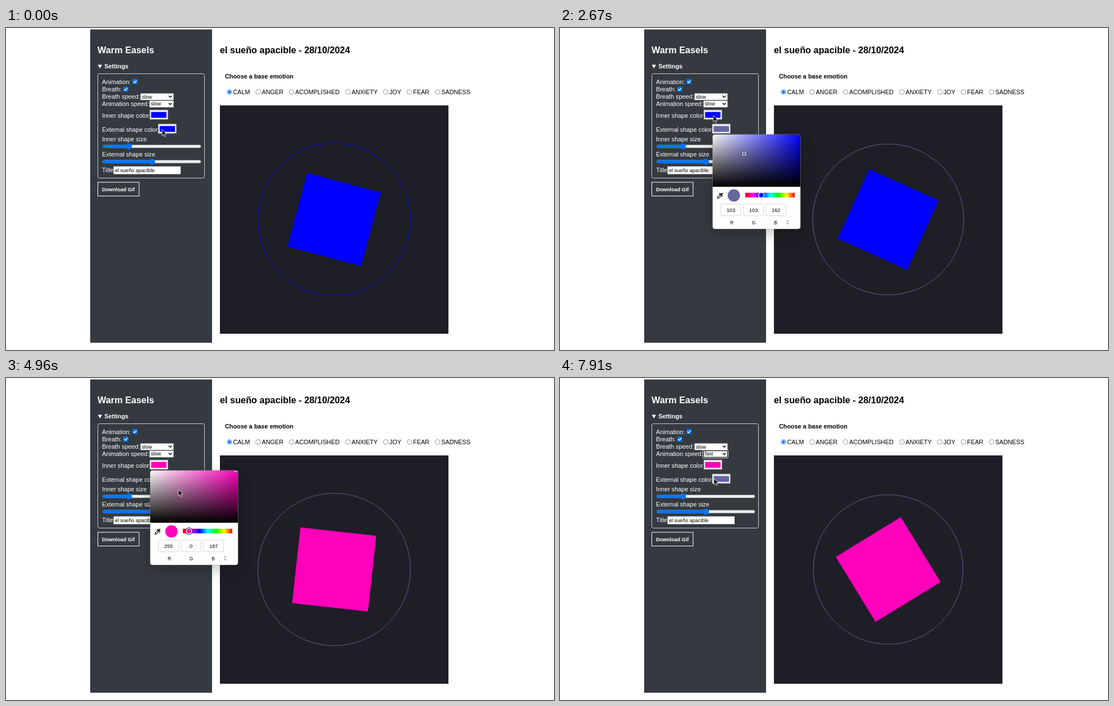
Recreate the animation shown at these times as an HTML page. Size 976 by 574 pixels, loop 8 s.

```html
<!DOCTYPE html>
<html lang="en">
<head>
<meta charset="utf-8">
<title>Warm Easels</title>
<style>
  html, body { margin: 0; width: 100%; height: 100%; overflow: hidden; background: #fff; }
  svg { position: absolute; left: 0; top: 0; overflow: hidden; }
  text { font: 10.87px "Liberation Sans", Arial, sans-serif; }
  .h { font-size: 16.3px; font-weight: bold; }
  .b { font-weight: bold; }
  .s { font-size: 9.05px; }
  .m { font-size: 9.2px; text-anchor: middle; }
  .w { fill: #fff; }
  .box { fill: #fff; stroke: #767676; stroke-width: .7; }
  .line { fill: none; stroke: #fff; }
  .chevron { fill: none; stroke: #000; stroke-width: 1.3; }
  #picker, #menu { position: absolute; box-sizing: border-box; overflow: hidden; }
  #picker { width: 158px; height: 170px; border-radius: 5px; border: 1px solid rgba(128,128,128,.5);
            box-shadow: 0 10px 22px rgba(0,0,0,.2); }
  #picker svg { left: -1px; top: -1px; }
  #menu { left: 256px; top: 142px; width: 43px; height: 49px; border-radius: 2px 2px 4px 4px;
          background: #fff; box-shadow: 0 2px 5px rgba(0,0,0,.3); }
</style>
</head>
<body>
<svg width="976" height="574">
  <rect x="150" y="2.5" width="217" height="558.5" fill="#343a40"/>
  <g class="w">
    <text class="h" x="163" y="45">Warm Easels</text>
    <path d="M163.5 65.5h7.5l-3.75 6.5z"/>
    <text class="b" x="175.3" y="72">Settings</text>
    <text x="171" y="100">Animation:</text>
    <text x="171" y="113">Breath:</text>
    <text x="171" y="126">Breath speed:</text>
    <text x="171" y="138.5">Animation speed:</text>
    <text x="171" y="159.5">Inner shape color</text>
    <text x="171" y="184.5">External shape color</text>
    <text x="171" y="201.5">Inner shape size</text>
    <text x="171" y="228.5">External shape size</text>
    <text x="171" y="257">Title</text>
    <text class="s b" x="171" y="290.5">Download Gif</text>
  </g>
  <rect class="line" x="163.5" y="81.5" width="190" height="186" rx="3" stroke-opacity=".75"/>
  <rect class="line" x="163.5" y="275" width="73.5" height="24.5"/>
  <g id="checks"></g>

  <rect class="box" x="239.5" y="116.5" width="59" height="12"/>
  <text class="s" x="242" y="125.5">slow</text>
  <path class="chevron" d="M289.7 120.7l2.8 2.8 2.8-2.8"/>
  <rect class="box" x="255.5" y="129.5" width="43" height="12"/>
  <text class="s" id="speed" x="258" y="138.2">slow</text>
  <path class="chevron" d="M289.7 133.7l2.8 2.8 2.8-2.8"/>
  <g id="focus" fill="none">
    <rect x="254.6" y="128.6" width="44.8" height="13.8" rx="1.5" stroke="#fff"/>
    <rect x="255.6" y="129.6" width="42.8" height="11.8" rx="1" stroke="#101010" stroke-width="1.3"/>
  </g>

  <g fill="#efefef" stroke="#767676" stroke-width=".7">
    <rect x="256" y="146" width="32.5" height="17"/>
    <rect x="271" y="171" width="32.5" height="17"/>
  </g>
  <rect id="innerSwatch" x="258.5" y="149.7" width="27.3" height="10.3"/>
  <rect id="outerSwatch" x="273.7" y="174.8" width="27.3" height="10.3"/>
  <g id="sliders"></g>
  <rect x="191.5" y="246.7" width="119.5" height="13.8" fill="#fff"/>
  <text class="s" x="194" y="256.7">el sueño apacible</text>

  <text class="h" x="381" y="45">el sueño apacible - 28/10/2024</text>
  <text class="b" x="390" y="90">Choose a base emotion</text>
  <g id="radios"></g>
  <rect x="381" y="138" width="407" height="407" fill="#1e1e26"/>
  <circle id="ring" cx="584.5" cy="341.3" fill="none" stroke-width=".9"/>
  <rect id="square" x="-67.9" y="-67.9" width="135.8" height="135.8"/>
</svg>

<div id="picker">
  <svg id="panel" width="158" height="170">
    <defs>
      <linearGradient id="tint"><stop stop-color="#fff"/><stop id="pure" offset="1"/></linearGradient>
      <linearGradient id="shade" x2="0" y2="1">
        <stop stop-opacity="0"/><stop offset="1"/>
      </linearGradient>
      <linearGradient id="hues"></linearGradient>
    </defs>
    <rect width="158" height="170" fill="#fff"/>
    <rect width="158" height="94" fill="url(#tint)"/>
    <rect width="158" height="94" fill="url(#shade)"/>
    <g id="spot" fill="none">
      <circle r="4.6" stroke="#000" stroke-width="1"/>
      <circle r="3.6" stroke="#fff" stroke-width="1.4"/>
    </g>
    <g fill="none" stroke="#111" stroke-width="1.2">
      <path d="M9.5 114.5l.6-2.6 4.6-4.6 2 2-4.6 4.6z"/>
      <path d="M13.7 106.2l4 4M16 107.8l2-2" stroke-width="2.2" stroke-linecap="round"/>
    </g>
    <circle id="sample" cx="38.7" cy="109.5" r="11"/>
    <rect x="59" y="104.7" width="88" height="8.3" fill="url(#hues)"/>
    <circle id="halo" cy="109" r="6.5"/>
    <circle id="thumb" cy="109" r="4.8" stroke="#fff" stroke-width="1.4"/>
    <g id="fields"></g>
    <path d="M132.6 156.3l1.6-1.8 1.6 1.8M132.6 158.8l1.6 1.8 1.6-1.8" fill="none" stroke="#222" stroke-width=".9"/>
  </svg>
</div>

<div id="menu">
  <svg width="43" height="49">
    <rect id="hover" width="43" height="16.3" fill="#1a66d0"/>
    <g id="options"></g>
  </svg>
</div>

<svg width="976" height="574">
  <path id="pointer" d="M0 0v11.2l2.6-2.4 1.8 4 1.8-.8-1.8-3.9h3.6z" fill="#000" stroke="#fff" stroke-width=".8"/>
</svg>

<script>
const $ = id => document.getElementById(id);
const set = (id, attrs) => { for (const k in attrs) $(id).setAttribute(k, attrs[k]); };
const show = (id, on) => { $(id).style.display = on ? "" : "none"; };
const fill = (id, items, make) => { $(id).innerHTML = items.map(make).join(""); };

// Static repeats
fill("checks", [[225.3, 91], [208.8, 104.5]], ([x, y]) =>
  `<rect x="${x}" y="${y}" width="9" height="9" rx="1.5" fill="#0075ff"/>
   <path class="line" d="M${x + 1.7} ${y + 4.6}l2 2 3.6-4.2" stroke-width="1.4"/>`);
fill("sliders", [[219, 211], [260, 238.3]], ([x, y]) =>
  `<rect x="172.5" y="${y - 2.5}" width="174.5" height="5" rx="2.5" fill="#efefef" stroke="#b2b2b2" stroke-width=".6"/>
   <rect x="172.3" y="${y - 2.7}" width="${x - 172}" height="5.4" rx="2.7" fill="#0075ff"/>
   <circle cx="${x}" cy="${y}" r="5.4" fill="#0075ff"/>`);
fill("radios", [["CALM", 398], ["ANGER", 449], ["ACOMPLISHED", 508.5], ["ANXIETY", 609],
  ["JOY", 676.3], ["FEAR", 718.5], ["SADNESS", 768.7]], ([name, x], i) =>
  `<circle cx="${x}" cy="114" r="4.1" fill="#fff" stroke="${i ? "#767676" : "#0075ff"}" stroke-width=".8"/>
   ${i ? "" : `<circle cx="${x}" cy="114" r="2.7" fill="#0075ff"/>`}
   <text x="${x + 6.5}" y="118">${name}</text>`);
fill("hues", [0, 1, 2, 3, 4, 5, 6], i =>
  `<stop offset="${i / 6}" stop-color="hsl(${360 - i * 60},100%,50%)"/>`);
fill("fields", ["R", "G", "B"], (name, i) =>
  `<rect x="${15.5 + i * 40.3}" y="124.8" width="35.5" height="21" rx="1.5" fill="#fff" stroke="#d4d4d4"/>
   <text class="m" id="value${i}" x="${33.4 + i * 40.2}" y="138.7"></text>
   <text class="m" x="${35 + i * 39}" y="160.5" style="font-size:8.5px">${name}</text>`);
fill("options", ["slow", "normal", "fast"], (name, i) =>
  `<text class="s" id="option${i}" x="2.5" y="${12.2 + i * 16.2}">${name}</text>`);

// Linear interpolation through rows of [key, ...values]
function at(rows, key) {
  const i = rows.findIndex(r => r[0] > key);
  if (i < 0) return rows.at(-1).slice(1);
  const a = rows[i - 1], b = rows[i], f = (key - a[0]) / (b[0] - a[0]);
  return a.slice(1).map((v, j) => v + (b[j + 1] - v) * f);
}

const ticks = [[0, 0], [150, 1], [1120, 8], [1270, 9], [1520, 11], [1650, 12], [2310, 17], [2430, 18],
  [2670, 20], [2790, 21], [3330, 25], [3480, 26], [3990, 30], [4140, 31], [4410, 33], [4540, 34],
  [4960, 37], [5110, 38], [5510, 41], [5660, 42], [6140, 46], [6260, 47], [6560, 49], [6710, 50],
  [7640, 57], [7790, 58], [7910, 59], [8000, 60]];
const steps = ticks.map(([ms, n]) => [n, ms]);
const spin = [[0, 15], [1520, 121.7], [2670, 204.3], [3990, 298.3], [4960, 366.3], [6140, 451],
  [6850, 501.5], [7910, 688.5], [8000, 704.4]];
const path = [[0, 278, 181], [700, 278, 181], [1520, 329, 225], [1650, 328, 224], [2000, 328, 224],
  [2310, 275, 167], [2670, 273, 156], [3100, 273, 156], [3900, 327, 272], [4350, 327, 272],
  [4960, 307, 199], [5450, 269, 131], [6140, 269, 134], [6700, 274, 179], [8000, 274, 179]];

const BLUE = [0, 0, 255], MAUVE = [103, 103, 162], PINK = [255, 0, 187];
const css = c => `rgb(${c})`;

function drawPicker(t, inner, outer) {
  const first = t < 3000, color = first ? outer : inner, pink = color === PINK;
  const opened = first ? 560 : 3980, closed = first ? 2780 : 5700;
  show("picker", t >= opened && t < closed);
  show("panel", t >= opened + 140);
  $("picker").style.left = (first ? 270.6 : 255.6) + "px";
  $("picker").style.top = (first ? 189 : 164) + "px";
  set("pure", { "stop-color": css(pink ? PINK : BLUE) });
  set("spot", { transform: color === MAUVE ? "translate(57 35)" : "translate(154 0)" });
  set("sample", { fill: css(color) });
  set("thumb", { cx: pink ? 70 : 87.5, fill: css(pink ? PINK : BLUE) });
  set("halo", { cx: 70 });
  show("halo", pink);
  color.forEach((v, i) => { $("value" + i).textContent = v; });
}

function draw(ms) {
  const [t] = at(steps, Math.floor(at(ticks, ms)[0] + 1e-6));
  const inner = t < 4250 ? BLUE : PINK, outer = t < 1850 ? BLUE : MAUVE, fast = t >= 6830;
  const [x, y] = at(path, t);

  set("square", { fill: css(inner), transform: `translate(584.5 341.3) rotate(${at(spin, t)[0]})` });
  set("ring", { r: 135.9 - 2.9 * Math.sin(.0057 * t), stroke: css(outer) });
  set("innerSwatch", { fill: css(inner) });
  set("outerSwatch", { fill: css(outer) });
  $("speed").textContent = fast ? "fast" : "slow";
  show("focus", fast);
  drawPicker(t, inner, outer);

  const row = Math.min(2, Math.max(0, Math.floor((y - 142) / 16.2)));
  show("menu", t >= 5890 && !fast);
  set("hover", { y: row * 16.2 + .5 });
  for (let i = 0; i < 3; i++) set("option" + i, { fill: i === row ? "#fff" : "#000" });
  set("pointer", { transform: `translate(${x} ${y})` });
}

function loop() {
  draw(performance.now() % 8000);
  requestAnimationFrame(loop);
}
loop();
</script>
</body>
</html>
```
